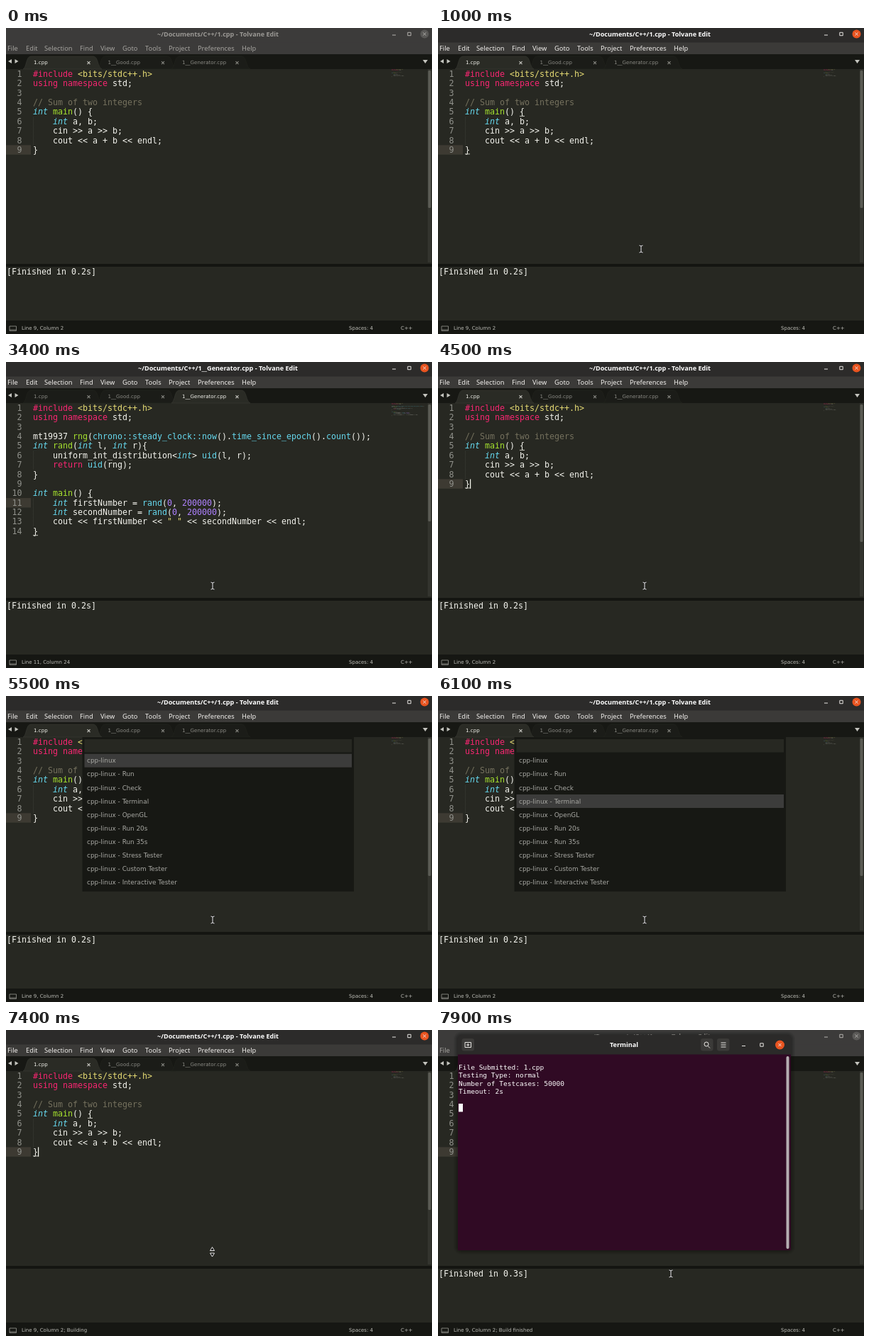
Recreate the animation shown at these times as an HTML page. Size 600 by 432 pixels, loop 8 s.

```html
<!DOCTYPE html>
<html lang="en">
<head>
<meta charset="utf-8">
<title>Editor and terminal</title>
<style>
html, body { margin: 0; width: 100%; height: 100%; overflow: hidden; background: #272822; }
svg { display: block; width: 600px; height: 432px; }
text { white-space: pre; }
.mono { font-family: "DejaVu Sans Mono", monospace; }
.ui { font-family: "DejaVu Sans", sans-serif; }
.menu { font-family: "Noto Sans", "Open Sans", sans-serif; }
.bold { font-family: "Open Sans", "Noto Sans", sans-serif; font-weight: 700; }
</style>
</head>
<body>
<svg id="stage" viewBox="0 0 600 432"></svg>
<script>
const stage = document.getElementById('stage');
const LOOP = 8000, CHAR = 7, ROW = 13.36, LEFT = 38;
const APP = 'Tolvane Edit';
const INK = '#f4f4ee';

function el(parent, tag, attrs = {}, content) {
  const node = document.createElementNS('http://www.w3.org/2000/svg', tag);
  for (const k in attrs) node.setAttribute(k, attrs[k]);
  if (content !== undefined) node.textContent = content;
  parent.append(node);
  return node;
}
const group = (parent, attrs) => el(parent, 'g', attrs);
const rect = (p, x, y, width, height, fill, more) => el(p, 'rect', { x, y, width, height, fill, ...more });
const path = (p, d, fill, more) => el(p, 'path', { d, fill, ...more });
const text = (p, x, y, size, fill, cls, str, more) =>
  el(p, 'text', { x, y, 'font-size': size, fill, class: cls, ...more }, str);
const show = (node, on) => node.setAttribute('visibility', on ? 'visible' : 'hidden');
const baseline = line => 69 + (line - 1) * ROW;
const column = n => LEFT + n * CHAR;

const head = '#include <bits/stdc++.h>\nusing namespace std;\n\n';
const random = `mt19937 rng(chrono::steady_clock::now().time_since_epoch().count());
int rand(int l, int r){
    uniform_int_distribution<int> uid(l, r);
    return uid(rng);
}

`;
const files = [
  {
    name: '1.cpp', thumb: 254, line: 9, caret: 1, pairs: [[5, 11], [9, 0]], guides: [[6, 8]],
    status: 'Line 9, Column 2',
    code: head + `// Sum of two integers
int main() {
    int a, b;
    cin >> a >> b;
    cout << a + b << endl;
}`
  },
  {
    name: '1__Good.cpp', thumb: 220, line: 14, caret: 21, pairs: [[14, 20], [14, 40]], guides: [[6, 7], [12, 14]],
    status: "error:14:34: no match for 'operator==' (operand types are 'std::basic_ostream<char>' and 'int'), Line 14, Column 22",
    code: head + random + `// Sum of two integers, with an extra random value added
int main() {
    int a, b;
    cin >> a >> b;
    cout << a + b + (rand(0, 100) == 100) << endl;
}`
  },
  {
    name: '1__Generator.cpp', thumb: 225, line: 11, caret: 23, pairs: [[10, 11], [14, 0]], guides: [[6, 7], [11, 13]],
    status: 'Line 11, Column 24',
    code: head + random + `int main() {
    int firstNumber = rand(0, 200000);
    int secondNumber = rand(0, 200000);
    cout << firstNumber << " " << secondNumber << endl;
}`
  }
];

// Token kinds in the order of the capture groups below.
const kinds = ['#75715e', '#e6db74', '#f92672', '#66d9ef', '#ae81ff', '#a6e22e', '#66d9ef'];
const syntax = /(\/\/.*)|(<bits.*?>|" ")|(#include|using namespace|return)|(\bint\b)|(\b\d+\b)|((?<=^\w+ )\w+(?=\())|([a-z_]\w*(?:::\w+)*(?=\())/g;

function codeLine(parent, str, y) {
  const node = text(parent, LEFT, y, 11.63, INK, 'mono');
  let last = 0;
  for (const m of str.matchAll(syntax)) {
    node.append(str.slice(last, m.index));
    const kind = m.slice(1).findIndex(Boolean);
    const attrs = { fill: kinds[kind] };
    if (kind === 3) attrs['font-style'] = 'italic';
    el(node, 'tspan', attrs, m[0]);
    last = m.index + m[0].length;
  }
  node.append(str.slice(last));
}

// Window frame
rect(stage, 0, 0, 600, 432, '#272822');
const bar = rect(stage, 0, 0, 600, 21, '#2c2b29');
const menuBar = rect(stage, 0, 20.5, 600, 17, '#3b3a38');
const title = text(stage, 298.5, 12, 9.1, '#fff', 'bold', '', { 'text-anchor': 'middle' });
const menus = group(stage);
const menuItems = { File: 2, Edit: 28, Selection: 54, Find: 104, View: 133, Goto: 164, Tools: 196, Project: 229, Preferences: 270, Help: 332 };
for (const name in menuItems) text(menus, menuItems[name], 32, 9.3, 'inherit', 'menu', name).removeAttribute('fill');

function windowButtons(p, xs, y, r) {
  const g = group(p, { fill: 'none', stroke: '#e8e6e3' });
  el(g, 'path', { d: `M${xs[0] - 2.5} ${y + 1.5}h5M${xs[1] - 2.2} ${y - 2.2}h4.4v4.4h-4.4z` });
  const disc = el(g, 'circle', { cx: xs[2], cy: y, r, fill: '#e95420', stroke: 'none' });
  el(g, 'path', { d: `M${xs[2] - 2} ${y - 2}l4 4m0 -4l-4 4` });
  return { g, disc };
}
const buttons = windowButtons(stage, [546.5, 568, 589.5], 8.5, 6);

// Tab strip
rect(stage, 0, 37, 600, 21, '#171814');
path(stage, 'M8 44v6l-5 -3zM12.500 44v6l5 -3zM587 45h7l-3.500 5z', '#c4c4be');

const tabs = files.map((file, i) => {
  const x = 24 + i * 104.5;
  const g = group(stage);
  const shape = path(g, `M${x} 58C${x + 5} 56 ${x + 4} 40 ${x + 11} 40H${x + 99}C${x + 106} 40 ${x + 105} 56 ${x + 111} 58z`,
    '#1d1e1a', { stroke: '#24251f', 'stroke-width': .6 });
  const label = text(g, x + 15, 51, 7.1, '#898983', 'ui', file.name);
  const cross = el(g, 'path', { d: `M${x + 90.5} 47.200l4 4m0 -4l-4 4`, stroke: '#898983', 'stroke-width': 1.1 });
  return { g, shape, label, cross };
});
const tabTop = group(stage);

// Editor views
const views = files.map((file, n) => {
  const g = group(stage);
  rect(g, 0, baseline(file.line) - 10.5, 35, 13.4, '#3d3a32');
  for (const [a, b] of file.guides)
    el(g, 'path', { d: `M38.500 ${baseline(a) - 10}V${baseline(b) + 3}`, stroke: '#45463e', 'stroke-dasharray': '1 1', 'stroke-width': .8 });
  const lines = file.code.split('\n');
  const code = group(g, { id: 'code' + n });
  lines.forEach((str, i) => {
    text(g, 22.5, baseline(i + 1), 11.63, '#90918b', 'mono', i + 1, { 'text-anchor': 'end' });
    codeLine(code, str, baseline(i + 1));
  });
  el(g, 'use', { href: '#code' + n, transform: 'translate(539.3 52.300) scale(.0975)', opacity: .8 });
  rect(g, 594, 58, 5, 273, '#33342e');
  rect(g, 594.5, 60, 4, file.thumb - 60, '#5b5c55', { rx: 1.5 });
  const marks = group(g);
  for (const [line, col] of file.pairs) rect(marks, column(col), baseline(line) + 1.5, 7, 1, '#c5c5bd');
  const caret = rect(g, column(file.caret), baseline(file.line) - 10.5, 1.2, 13.4, '#f8f8f0');
  return { g, marks, caret };
});

// Output panel and status bar
rect(stage, 0, 333, 600, 4, '#141511');
const output = text(stage, 1, 348, 11.63, INK, 'mono', '');
rect(stage, 0, 413, 600, 19, '#161713');
el(stage, 'path', { d: 'M5 421h9.500v6.500h-9.500zM5 426h9.500', fill: 'none', stroke: '#8b8b85', 'stroke-width': .9 });
const status = text(stage, 22, 426.300, 7, '#bdbdb7', 'ui', '');
const spaces = text(stage, 483, 426.300, 7, '#bdbdb7', 'ui', '');
const lang = text(stage, 556, 426.300, 7, '#bdbdb7', 'ui', 'C++');

// Build system list
const palette = group(stage);
rect(palette, 107.5, 58, 382.5, 218, '#171814');
rect(palette, 110.5, 61, 376.5, 18.5, '#272822');
const choice = rect(palette, 110.5, 0, 376.5, 19, '#3c3c3b');
['', ' - Run', ' - Check', ' - Terminal', ' - OpenGL', ' - Run 20s', ' - Run 35s',
  ' - Stress Tester', ' - Custom Tester', ' - Interactive Tester'].forEach((name, i) =>
  text(palette, 114, 94.3 + i * 19.1, 8.9, '#a9a9a4', 'ui', 'cpp-linux' + name));

// Terminal window
const terminal = group(stage);
for (let i = 6; i > 0; i--) rect(terminal, 28 - i, 8 - i, 469 + 2 * i, 303 + 2 * i, '#000', { rx: 5 + i, opacity: .06 });
path(terminal, 'M28 36V12q0 -5 5 -5H492q5 0 5 5V36z', '#2b2a29');
rect(terminal, 28, 34.5, 469, 276.5, '#300a24');
text(terminal, 262, 24, 9.1, '#fff', 'bold', 'Terminal', { 'text-anchor': 'middle' });
for (const x of [33.5, 370, 393]) rect(terminal, x, 12, 17.5, 17.5, '#3b3a38', { rx: 3 });
el(terminal, 'path', {
  d: 'M38 17.500h8.500v7h-8.500zM42.250 19v4m-2 -2h4M380 22.500l3 3M398.500 18h7m-7 3h7m-7 3h7',
  fill: 'none', stroke: '#e8e6e3'
});
el(terminal, 'circle', { cx: 378, cy: 20, r: 3, fill: 'none', stroke: '#e8e6e3' });
windowButtons(terminal, [430.5, 456, 481.5], 21, 6.5);
rect(terminal, 490.5, 37, 4, 272, '#b5aeb1', { rx: 2 });
const report = group(terminal);
['File Submitted: 1.cpp', 'Testing Type: normal', 'Number of Testcases: 50000', 'Timeout: 2s'].forEach((str, i) =>
  text(report, 29, 56 + i * 11.4, 9.52, '#fff', 'mono', str));
const block = rect(terminal, 29, 104, 6, 11.5, '#fff');

// Pointers
const beam = group(stage, { fill: 'none' });
for (const [stroke, width] of [['#111', 2.4], ['#fff', 1]])
  el(beam, 'path', { d: 'M-2.500 -5q2.500 0 2.500 1.500q0 -1.500 2.500 -1.500M0 -3.500v7M-2.500 5q2.500 0 2.500 -1.500q0 1.500 2.500 1.500', stroke, 'stroke-width': width });
const resize = path(stage, 'M0 -6.500l3 5h-6zM0 7l3 -5h-6z', '#111', { stroke: '#fff', 'stroke-width': .9 });

// Tables of [time, value]
const fileAt = [[0, 0], [1200, 1], [2500, 2], [4100, 0]];
const choiceAt = [[5000, 0], [5700, 1], [5850, 2], [6000, 3], [6200, 4], [6350, 5], [6500, 6], [6650, 7]];
const blinkAt = [[400, 0], [1200, 0], [2500, 0], [4100, 0], [7000, 0]];
const pointerAt = [[0, [286, 312]], [2600, [286, 312]], [3000, [291, 316]], [7000, [291, 316]],
  [7200, [290.5, 313]], [7400, [290.5, 313]], [7800, [328, 344]], [8000, [328, 344]]];

const stepAt = (table, t) => table.filter(([s]) => s <= t).pop() || table[0];
function pointer(t) {
  const i = pointerAt.findIndex(([s]) => s > t);
  const [t0, a] = pointerAt[i - 1], [t1, b] = pointerAt[i];
  const k = (t - t0) / (t1 - t0);
  return a.map((v, j) => v + (b[j] - v) * k);
}

function draw(t) {
  const current = stepAt(fileAt, t)[1];
  const file = files[current];
  const listOpen = t >= 5000 && t < 7000;
  const focused = t >= 400 && t < 7600;
  const typing = focused && !listOpen;
  const building = t >= 7100 && t < 7500, built = t >= 7500;

  bar.setAttribute('fill', focused ? '#2c2b2a' : '#3c3b3a');
  menuBar.setAttribute('fill', focused ? '#3b3a38' : '#3c3b3a');
  title.setAttribute('fill', focused ? '#fff' : '#9b9995');
  title.textContent = `~/Documents/C++/${file.name} - ${APP}`;
  menus.setAttribute('fill', focused ? '#f2f0ed' : '#a5a39f');
  buttons.g.setAttribute('stroke', focused ? '#e8e6e3' : '#b5b3af');
  buttons.disc.setAttribute('fill', focused ? '#e95420' : '#5a5957');

  tabs.forEach((tab, i) => {
    const on = i === current;
    tab.shape.setAttribute('fill', on ? '#2a2b25' : '#1b1c18');
    tab.shape.setAttribute('stroke', on ? '#3a3b34' : '#24251f');
    tab.label.setAttribute('fill', on ? '#f0f0ea' : '#898983');
    tab.cross.setAttribute('stroke', on ? '#c8c8c2' : '#898983');
    show(views[i].g, on);
    show(views[i].marks, on && typing);
    show(views[i].caret, on && typing && (t - stepAt(blinkAt, t)[0]) % 1000 < 500);
  });
  if (tabTop.firstChild !== tabs[current].g) {
    while (tabTop.firstChild) stage.insertBefore(tabTop.firstChild, tabTop);
    tabTop.append(tabs[current].g);
  }

  output.textContent = building ? '' : `[Finished in ${built ? '0.3' : '0.2'}s]`;
  status.textContent = file.status + (building ? '; Building' : built ? '; Build finished' : '');
  spaces.setAttribute('x', current === 1 ? 566 : 483);
  spaces.textContent = current === 1 ? 'Spaces:' : 'Spaces: 4';
  show(lang, current !== 1);

  show(palette, listOpen);
  choice.setAttribute('y', 81.7 + stepAt(choiceAt, t)[1] * 19.1);

  show(terminal, t >= 7600);
  const grow = Math.min(1, .9 + (t - 7600) / 1500);
  terminal.setAttribute('transform', `translate(262 159) scale(${grow}) translate(-262 -159)`);
  terminal.setAttribute('opacity', Math.max(0, Math.min(1, .5 + (t - 7600) / 300)));
  show(report, t >= 7800);
  block.setAttribute('y', t >= 7800 ? 104 : 47);

  const place = `translate(${pointer(t)})`;
  const sizing = t >= 7200 && t < 7600;
  beam.setAttribute('transform', place);
  resize.setAttribute('transform', place);
  show(beam, t >= 400 && !sizing);
  show(resize, sizing);
}

const start = performance.now();
function frame() {
  const t = (performance.now() - start) % LOOP;
  draw(Math.floor(t / 100) * 100);
  requestAnimationFrame(frame);
}
frame();
</script>
</body>
</html>
```
